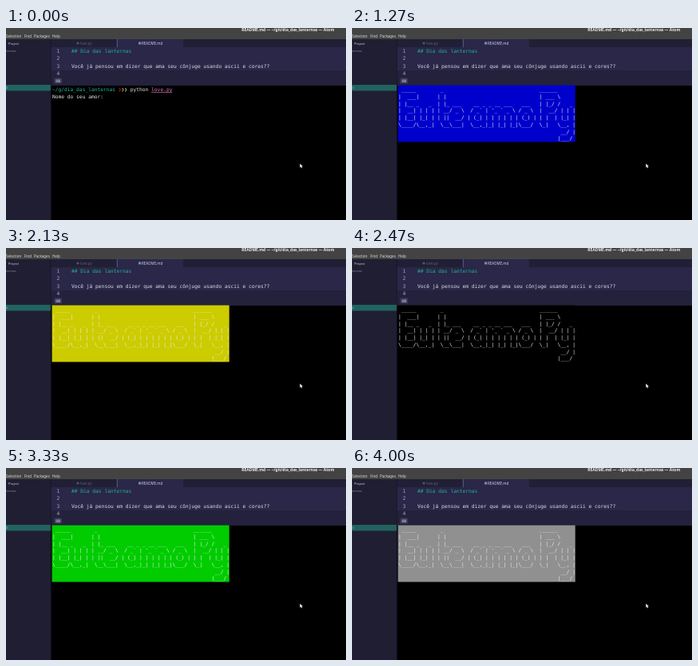
Recreate the animation shown at these times as an HTML page. Size 426x240 px, loop 4070 ms.

```html
<!DOCTYPE html>
<html lang="pt">
<head>
<meta charset="utf-8">
<style>
html, body { margin: 0; width: 100%; height: 100%; overflow: hidden; background: #000; }
svg { display: block; width: 100vw; height: 100vh; }
text { white-space: pre; }
.mono { font: 6.25px "DejaVu Sans Mono", "Noto Sans Mono", monospace; }
.ui { font: 4.5px "Noto Sans", "Open Sans", sans-serif; }
</style>
</head>
<body>
<svg viewBox="0 0 426 240">
  <rect width="426" height="240" fill="#000"/>

  <!-- window and menu -->
  <rect width="426" height="14" fill="#434343"/>
  <text class="ui" x="353.3" y="3.8" text-anchor="middle" fill="#eee" style="font-size:4.95px;font-weight:600">README.md — ~/git/dia_das_lanternas — Atom</text>
  <g class="ui" fill="#d8d8d8">
    <text x="0" y="11.8">Selection</text>
    <text x="23" y="11.8">Find</text>
    <text x="35" y="11.8">Packages</text>
    <text x="58" y="11.8">Help</text>
  </g>

  <!-- file tree -->
  <rect y="14" width="56" height="226" fill="#201e32"/>
  <rect y="71" width="56" height="7.5" fill="#22635f"/>
  <g class="ui">
    <text x="3" y="20.6" fill="#d0d0dc" style="font-size:4px">Project</text>
    <text x="0" y="29.8" fill="#8584a0" style="font-size:4.2px">ternas</text>
    <text x="0" y="76.2" fill="#35c5a8" style="font-size:4px">d</text>
  </g>

  <!-- tabs -->
  <rect x="56" y="14" width="370" height="10" fill="#211f35"/>
  <rect x="139" y="14" width="83" height="10" fill="#2a2748"/>
  <path d="M139.3 14V24" stroke="#6878b0" stroke-width=".7"/>
  <circle cx="90" cy="19" r="1.6" fill="#4d5870"/>
  <rect x="166" y="17.5" width="3.2" height="3" fill="#7c8cae"/>
  <g class="ui">
    <text x="93" y="20.6" fill="#5c5a78">love.py</text>
    <text x="170" y="20.6" fill="#cfcfe0">README.md</text>
  </g>

  <!-- editor -->
  <rect x="56" y="24" width="370" height="29" fill="#2a2748"/>
  <rect x="56" y="53" width="370" height="19" fill="#23213b"/>
  <g class="mono" fill="#a8a6c4">
    <text x="63.5" y="30.6">1</text>
    <text x="63.5" y="40.1">2</text>
    <text x="63.5" y="49.6">3</text>
    <text x="63.5" y="59.1">4</text>
    <text x="82" y="30.6" fill="#20b392">## Dia das lanternas</text>
    <text x="82" y="49.6" fill="#dcdce6">Você já pensou em dizer que ama seu cônjuge usando ascii e cores??</text>
  </g>
  <rect x="60.5" y="62.5" width="9.5" height="7" rx="1" fill="#3d3a59"/>
  <rect x="62.5" y="64.5" width="5.5" height="3.4" fill="#8d8ba5"/>
  <path d="M63 65.6h4.6M63 66.9h4.6" stroke="#3d3a59" stroke-width=".5" stroke-dasharray=".7 .5"/>
  <path d="M56.3 14V240" stroke="#17152a" stroke-width=".7"/>

  <!-- terminal -->
  <g id="prompt" class="mono" fill="#e4e4e4">
    <text x="58" y="79.2" fill="#1fb8a0">~/g/dia_das_lanternas</text>
    <text x="140.7" y="79.2" fill="#d01818">❯</text>
    <text x="144.5" y="79.2" fill="#d8c860">❯</text>
    <text x="148.3" y="79.2" fill="#b8e0b0">❯</text>
    <text x="155.8" y="79.2">python</text>
    <text x="182.1" y="79.2" fill="#d878c0">love.py</text>
    <path d="M182.1 80.4h26.3" stroke="#d878c0" stroke-width=".7"/>
    <text id="ask" x="58" y="87.9"></text>
  </g>
  <g id="banner">
    <rect id="fill" x="57.6" y="71.6" width="222.1" height="70.8"/>
    <g id="art" class="mono" fill="#f0f0f0"></g>
  </g>

  <path d="M368.3 169.4v5l1.2-1 .8 1.8.9-.4-.8-1.7h1.5z" fill="#eee"/>
</svg>
<script>
const LOOP = 4070;
const $ = id => document.getElementById(id);

const TICK = "\u0060";
const ART = String.raw`
 _____        _                                ______
|  ___|      | |                               | ___ \
| |__ _   _  | |_ ___    __ _ _ __ ___   ___   | |_/ /   _
|  __| | | | | __/ _ \  / _${TICK} | '_ ${TICK} _ \ / _ \  |  __/ | | |
| |__| |_| | | ||  __/ | (_| | | | | | | (_) | | |  | |_| |
\____/\__,_|  \__\___|  \__,_|_| |_| |_|\___/  \_|   \__, |
                                                      __/ |
                                                     |___/`.split("\n").slice(1);

ART.forEach((row, i) => {
  const line = document.createElementNS("http://www.w3.org/2000/svg", "text");
  line.setAttribute("x", 58);
  line.setAttribute("y", 79 + i * 8.75);
  line.textContent = row;
  $("art").append(line);
});

const TYPED = [[0, ""], [70, "P"], [330, "Py"]];
const COLORS = [
  [1130, "#0000cc"], [1470, "#00cccc"], [1800, "#cc00cc"], [2070, "#cccc00"],
  [2330, "#000000"], [2730, "#00cccc"], [3000, "#cc0000"], [3330, "#00cc00"],
  [3600, "#cccc00"], [3930, "#909090"]
];

// Latest value whose start time has passed
const at = (steps, t) => steps.reduce((last, [start, value]) => t >= start ? value : last, null);

function draw(t) {
  const color = at(COLORS, t);
  $("prompt").style.display = color ? "none" : "";
  $("banner").style.display = color ? "" : "none";
  $("ask").textContent = "Nome do seu amor: " + at(TYPED, t);
  if (color) $("fill").setAttribute("fill", color);
}

const begin = performance.now();
function tick() {
  draw((performance.now() - begin) % LOOP);
  requestAnimationFrame(tick);
}
tick();
</script>
</body>
</html>
```
